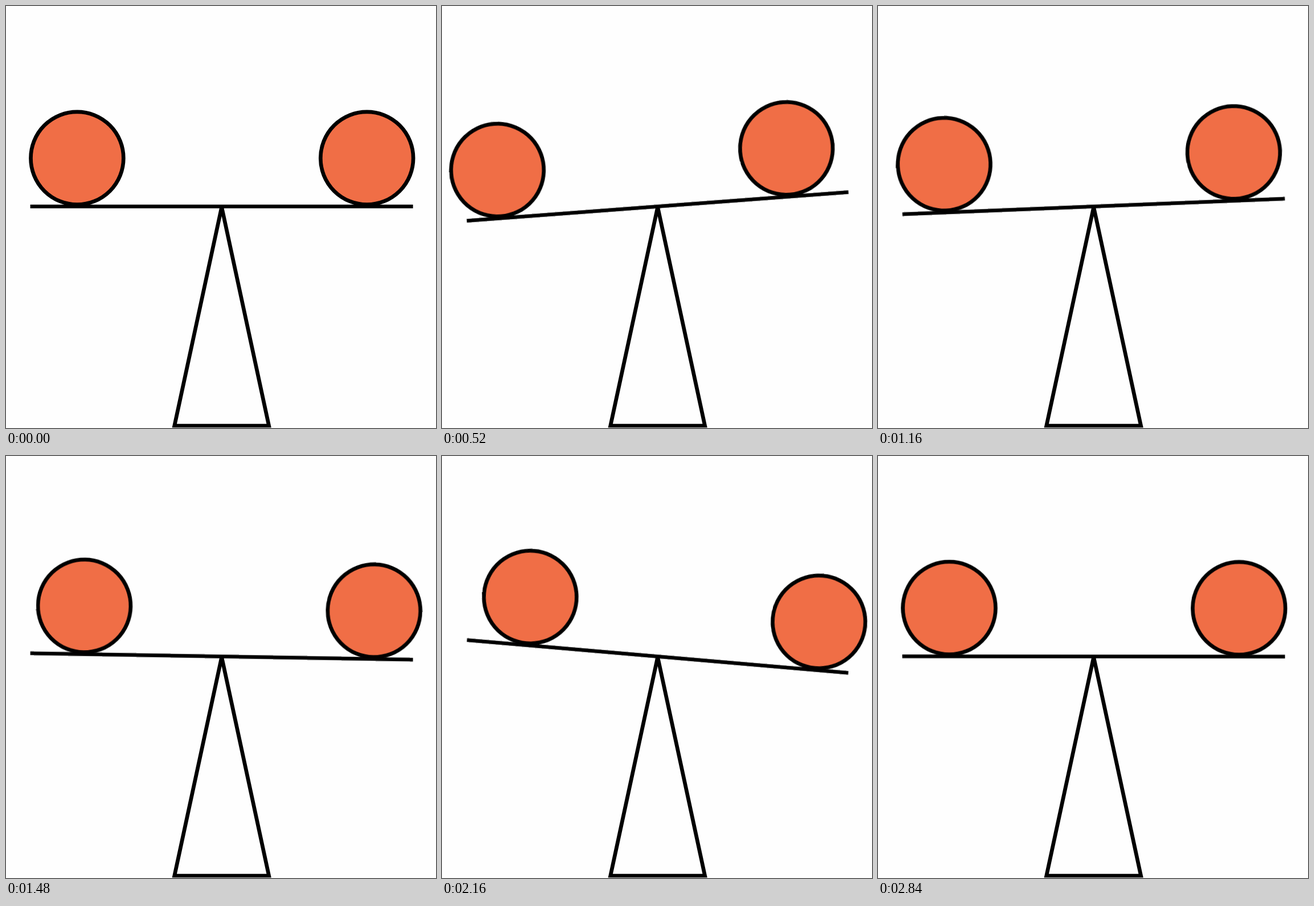
Animation of 755x741 px, one loop 2.88 s. Source, as an HTML page:

```html
<!DOCTYPE html>
<html lang="en">
<head>
<meta charset="utf-8">
<title>Balance</title>
<style>
  html, body { margin: 0; width: 100%; height: 100%; overflow: hidden; background: #fefefe; }
  svg { display: block; width: 100%; height: 100%; }
  .ink { stroke: #000; stroke-width: 6.7; fill: none; }
  .ball { fill: #f06e46; }
  #beam { transform-origin: 378.6px 352px; }

  /* Level, tipped left, tipped right, level again. */
  #beam, #balls { animation: 2880ms infinite; }
  #beam { animation-name: tilt; }
  #balls { animation-name: slide; }

  @keyframes tilt {
    0% { transform: rotate(0deg); animation-timing-function: cubic-bezier(.45, 0, .64, 1); }
    23.6% { transform: rotate(-5deg); animation-timing-function: cubic-bezier(.33, 0, .67, 1); }
    72.9% { transform: rotate(5deg); animation-timing-function: cubic-bezier(.34, 0, .74, 1); }
    100% { transform: rotate(0deg); }
  }

  @keyframes slide {
    0% { transform: translateX(0); animation-timing-function: cubic-bezier(.89, 0, .22, 1); }
    23.6% { transform: translateX(-23px); animation-timing-function: cubic-bezier(.3, 0, .45, 1); }
    72.9% { transform: translateX(23px); animation-timing-function: cubic-bezier(.17, 0, .61, 1); }
    100% { transform: translateX(0); }
  }
</style>
</head>
<body>
<svg viewBox="0 0 755 741">
  <path class="ink" d="M378.7 353 L461.6 737 H295.8 Z"/>
  <g id="beam">
    <g id="balls">
      <circle class="ink ball" cx="124.9" cy="267.2" r="81.4"/>
      <circle class="ink ball" cx="633.7" cy="267.2" r="81.4"/>
    </g>
    <path class="ink" d="M42.6 352 H714.6"/>
  </g>
</svg>
</body>
</html>
```
